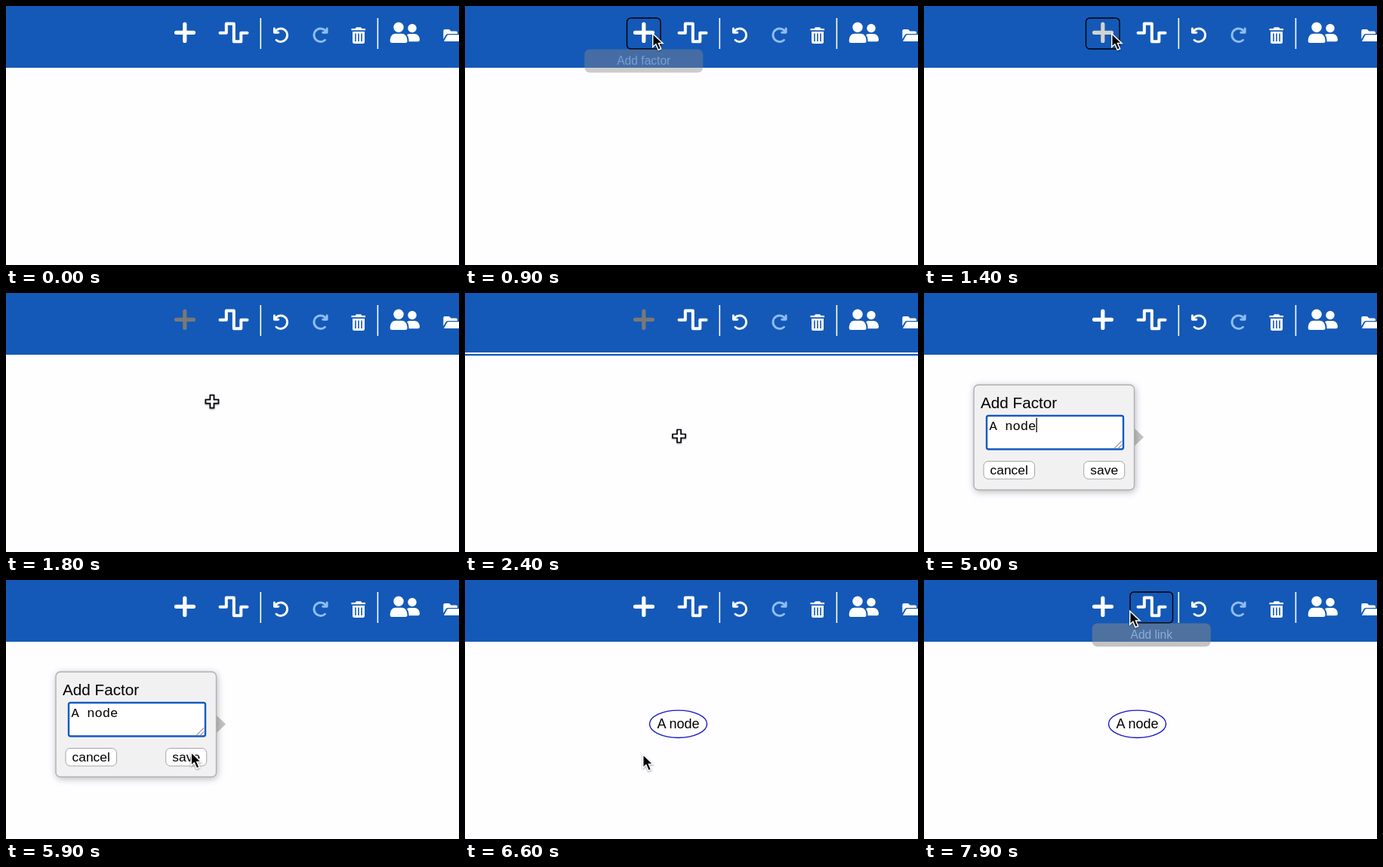
Write an HTML page that moves like this. It is 600 by 344 pixels and loops after 8000 ms.

```html
<!DOCTYPE html>
<html lang="en">
<head>
<meta charset="utf-8">
<title>Adding a factor</title>
<style>
  html, body { margin: 0; width: 100%; height: 100%; overflow: hidden; }
  svg { display: block; width: 600px; height: 344px; background: #fefdff; }
  text { font-family: "Liberation Sans", Arial, sans-serif; }
  .line { fill: none; stroke: #fff; }
  .button { fill: #fff; stroke: #a6a6a6; }
  #dialog { font-size: 17.4px; }
  #typed { font: 17.2px "Liberation Mono", monospace; white-space: pre; }
  #card { filter: drop-shadow(1px 2px 5px #0004); }
  #pointer, #cross { filter: drop-shadow(0 1px 1px #0006); }
</style>
</head>
<body>
<svg viewBox="0 0 600 344">
  <rect width="600" height="82" fill="#1459b7"/>
  <g id="rule">
    <path class="line" d="M0 80H600" stroke-width="2"/>
    <path d="M0 82.3H600" stroke="#1459b7" stroke-width="2"/>
  </g>

  <path id="plus" class="line" d="M225.5 35.3H248.5M236.8 24V46.5" stroke-width="5.2" stroke-linecap="round"/>
  <path class="line" d="M283.5 35.8H291.8V23.5H301.8V47.3H311.3V35.8H319.5" stroke-width="4" stroke-linecap="round" stroke-linejoin="round"/>
  <path class="line" d="M337.3 16V57M492.4 16V57" stroke-width="1.6"/>
  <defs>
    <g id="turn" fill="none" stroke-width="2.9" stroke-linecap="round" stroke-linejoin="round">
      <path d="M-8.6 -9V-3.8H-3.2M-8 -4A8.7 8.7 0 1 1 -6 6.2"/>
    </g>
  </defs>
  <use href="#turn" x="364" y="39" stroke="#fff"/>
  <use href="#turn" transform="translate(416.5 39) scale(-1 1)" stroke="#8fbcf2"/>
  <g fill="#fff">
    <path d="M457.5 30H462.5L464 28.2H470L471.5 30H476V32.3H457.5ZM459 34H475V47.5Q475 50 472.5 50H461.5Q459 50 459 47.5Z"/>
    <path d="M463 36.5V47M467 36.5V47M471 36.5V47" stroke="#1459b7" stroke-width="1.6"/>
    <circle cx="520" cy="28.3" r="6.7"/>
    <path d="M508.7 46.5C508.7 40 512 36.8 516 36.8H524C528 36.8 531.5 40 531.5 46.5Q531.5 49 529 49H511Q508.7 49 508.7 46.5Z"/>
    <circle cx="538" cy="29.5" r="5.7"/>
    <path d="M531 38.2Q533 37 535 37H541C545 37 548 40 548 45Q548 47.3 545.5 47.3H533.5Q533.8 41.5 531 38.2Z"/>
    <path d="M579.3 44V33Q579.3 31 581.3 31H587L589.5 33.5H596Q598 33.5 598 35.5V37H585Q583.3 37 582.5 38.5ZM580 47L584 39.5Q584.7 38.3 586 38.3H602V47Z"/>
  </g>
  <rect id="focus" y="16" height="41" rx="5" fill="none" stroke="#000" stroke-width="1.4"/>

  <g id="node">
    <ellipse cx="282.5" cy="191.3" rx="38" ry="18.2" fill="#fff" stroke="#1515c8" stroke-width="1.4"/>
    <text x="282.5" y="197" font-size="18" text-anchor="middle">A node</text>
  </g>

  <g id="dialog">
    <path d="M279 180L291 191.5L279 203Z" fill="#c3c3c3"/>
    <rect id="card" x="66" y="122" width="212.5" height="139.5" rx="6" fill="#f2f1f2" stroke="#b0b0b0" stroke-width="1.4"/>
    <text x="75" y="152.5" font-size="20.7">Add Factor</text>
    <rect x="83" y="163" width="181" height="44.5" rx="2.5" fill="#fff" stroke="#1459c4" stroke-width="2.4"/>
    <path d="M252.5 206L262 196.5M257.5 206L262 201.5" stroke="#555"/>
    <text id="typed" x="86.5" y="181.5"></text>
    <path id="caret" d="M0 166V185" stroke="#000" stroke-width="1.3"/>
    <rect class="button" x="79" y="223.5" width="67.5" height="23.5" rx="6"/>
    <text x="112.7" y="241" text-anchor="middle">cancel</text>
    <rect class="button" x="211.7" y="223.5" width="54" height="23.5" rx="6"/>
    <text x="238.7" y="241" text-anchor="middle">save</text>
  </g>

  <g id="tip">
    <rect x="-78.5" y="57.5" width="157" height="31" rx="7" fill="#8a8a8a"/>
    <text id="tipText" y="78.3" font-size="15.6" fill="#fff" text-anchor="middle"></text>
  </g>

  <path id="cross" d="M-2.5 -8.5H2.5V-2.5H8.5V2.5H2.5V8.5H-2.5V2.5H-8.5V-2.5H-2.5Z" fill="#fff" stroke="#000" stroke-width="1.7"/>
  <path id="pointer" d="M.7 .8V18.6L4.8 14.8L8.1 22.3L11.6 20.8L8.4 13.5H14Z" stroke="#fff" stroke-width="1.5"/>
</svg>
<script>
  const LOOP = 8000, TOOLBAR = 82;
  const OPEN = 2600, TYPE = 3900, MOVE = 5600, SAVE = 6500;
  const $ = id => document.getElementById(id);
  const show = (id, on) => $(id).setAttribute("visibility", on ? "visible" : "hidden");
  const ramp = (t, a, b) => Math.min(1, Math.max(0, (t - a) / (b - a)));
  const ease = p => p * p * (3 - 2 * p);
  const between = (t, a, b) => t >= a && t < b;

  // time, x, y of the pointer
  const path = [
    [50, 604, 130], [650, 248, 36], [1450, 248, 36], [2000, 283.5, 190],
    [5540, 283.5, 190], [5890, 244.5, 228], [6600, 235, 231], [7100, 235, 231], [7600, 272, 40.5]
  ];
  const keys = [3900, 4100, 4400, 4600, 4800, 5000];
  const tools = [
    { x: 214.5, width: 44.5, label: "Add factor", from: 650, to: 1300 },
    { x: 273, width: 56.5, label: "Add link", from: 7600, to: LOOP }
  ];

  function pointerAt(t) {
    let [, x, y] = path[0];
    path.slice(1).forEach(([end, nx, ny], i) => {
      const p = ease(ramp(t, path[i][0], end));
      x += (nx - x) * p;
      y += (ny - y) * p;
    });
    return [x, y];
  }

  function draw(t) {
    const [x, y] = pointerAt(t);
    const crosshair = y > TOOLBAR && between(t, 1450, OPEN);
    show("cross", crosshair);
    show("pointer", !crosshair && !between(t, TYPE, MOVE));
    for (const id of ["cross", "pointer"]) $(id).setAttribute("transform", `translate(${x} ${y})`);

    const hovered = tools.find(b => y < 57 && x >= b.x - 2 && x <= b.x + b.width);
    show("focus", hovered);
    if (hovered) {
      $("focus").setAttribute("x", hovered.x);
      $("focus").setAttribute("width", hovered.width);
    }

    const tool = tools.find(b => between(t, b.from, b.to));
    show("tip", tool);
    if (tool) {
      $("tip").setAttribute("transform", `translate(${tool.x + tool.width / 2} 0)`);
      $("tip").setAttribute("opacity", ramp(t, tool.from, tool.from + 600));
      $("tipText").textContent = tool.label;
    }

    const shade = t < OPEN ? 255 - 135 * ramp(t, 1300, 1600) : 255;
    $("plus").style.stroke = `rgb(${shade} ${shade} ${shade})`;
    show("rule", between(t, 2400, OPEN));

    const open = between(t, OPEN, SAVE);
    const count = keys.filter(k => t >= k).length;
    const blinkStart = t < TYPE ? OPEN : 5100;
    const typing = between(t, TYPE, 5100);
    $("dialog").style.display = open ? "" : "none";
    $("typed").textContent = "A node".slice(0, count);
    $("caret").setAttribute("transform", `translate(${87.2 + count * 10.32} 0)`);
    show("caret", open && (typing || (t - blinkStart) % 1000 < 500));
    show("node", t >= SAVE);
  }

  function tick() {
    draw(performance.now() % LOOP);
    requestAnimationFrame(tick);
  }
  tick();
</script>
</body>
</html>
```
